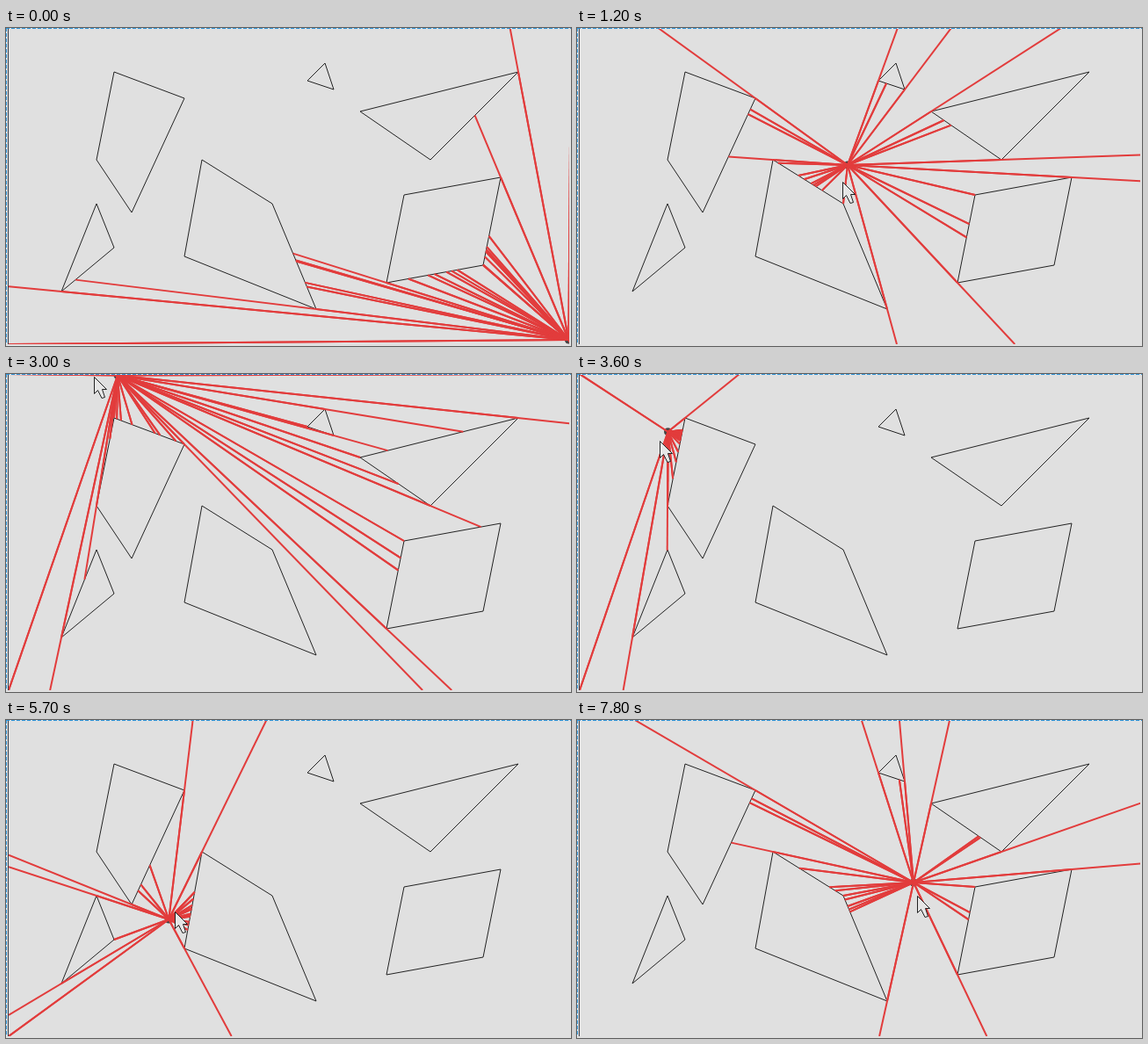
An HTML page with a canvas that plays this animation: 643 by 362 pixels, repeating every 8 s.

```html
<!DOCTYPE html>
<html lang="en">
<head>
<meta charset="utf-8">
<title>Sight rays</title>
<style>
html, body { margin: 0; width: 100%; height: 100%; overflow: hidden; background: #e0e0e0; }
canvas { display: block; }
</style>
</head>
<body>
<canvas id="stage" width="643" height="362"></canvas>
<script>
const ctx = document.getElementById('stage').getContext('2d');
const LOOP = 8000, STEP = 300;

const border = [[3, 0], [643, 0], [643, 360], [3, 360]];
const shapes = [
  [[103, 150], [123, 50], [203, 80], [143, 210]],
  [[103, 200], [123, 250], [63, 300]],
  [[203, 260], [223, 150], [303, 200], [353, 320]],
  [[343, 60], [363, 40], [373, 70]],
  [[453, 190], [563, 170], [543, 270], [433, 290]],
  [[403, 95], [583, 50], [483, 150]]
];
const arrow = [[0, 0], [0, 19], [4, 15], [8.5, 24], [12, 23], [9, 14], [14, 14]];

const all = [border, ...shapes];
const points = all.flat();
const segments = all.flatMap(p => p.map((a, i) => [a, p[(i + 1) % p.length]]));

// step, eye x, eye y, cursor offset x, cursor offset y
const keys = [
  [0, 640.3, 355, 20, 20],
  [4, 308, 156, -6, 19],
  [10, 127, 1.5, -27, 1.5],
  [14, 80, 130, 8, 19],
  [15, 99, 173, 8, 18],
  [17, 132, 214, 12, 10],
  [19, 185.3, 227, 6.5, -9],
  [21, 185, 193, 10, -3],
  [23, 299, 93, 17, 9],
  [26, 383, 185, 4, 15]
];

function pose(step) {
  const i = Math.max(1, keys.findIndex(k => k[0] >= step));
  const a = keys[i - 1], b = keys[i];
  const f = (step - a[0]) / (b[0] - a[0]);
  return a.map((v, j) => v + (b[j] - v) * f).slice(1);
}

function castRay(x, y, angle) {
  const dx = Math.cos(angle), dy = Math.sin(angle);
  let best = Infinity;
  for (const [a, b] of segments) {
    const sx = b[0] - a[0], sy = b[1] - a[1];
    const px = a[0] - x, py = a[1] - y;
    const det = dx * sy - dy * sx;
    const t = (px * sy - py * sx) / det;
    const u = (px * dy - py * dx) / det;
    if (t > 0 && u >= 0 && u <= 1 && t < best) best = t;
  }
  return best < Infinity ? [x + dx * best, y + dy * best] : [x, y];
}

function trace(pts) {
  ctx.beginPath();
  pts.forEach(p => ctx.lineTo(p[0], p[1]));
  ctx.closePath();
}

function drawFrame() {
  ctx.fillStyle = '#e0e0e0';
  ctx.fillRect(0, 0, 643, 362);

  // dashed selection edge
  ctx.fillStyle = '#cfe4f2';
  ctx.fillRect(0, 0, 643, 1);
  ctx.fillRect(0, 0, 1, 360);
  ctx.fillStyle = '#2f93d6';
  for (let i = 0; i < 643; i += 6) {
    ctx.fillRect(i, 0, 4, 1);
    if (i < 360) ctx.fillRect(0, i, 1, 4);
  }
  ctx.fillStyle = '#3a3f4a';
  ctx.fillRect(2, 1, 1, 359);
}

function draw(step) {
  const [x, y, ox, oy] = pose(step);
  drawFrame();

  ctx.save();
  ctx.beginPath();
  ctx.rect(3, 1, 638, 359);
  ctx.clip();

  ctx.strokeStyle = '#222';
  ctx.lineWidth = 1;
  for (const s of shapes) {
    trace(s);
    ctx.stroke();
  }

  ctx.fillStyle = '#444';
  ctx.beginPath();
  ctx.arc(x, y, 4.5, 0, 7);
  ctx.fill();

  // two rays per corner, one just to each side of it
  ctx.strokeStyle = '#e23c3c';
  ctx.lineWidth = 2;
  for (const p of points) {
    const angle = Math.atan2(p[1] - y, p[0] - x);
    for (const d of [-1e-5, 1e-5]) {
      ctx.beginPath();
      ctx.moveTo(x, y);
      ctx.lineTo(...castRay(x, y, angle + d));
      ctx.stroke();
    }
  }

  if (step > 0) {
    ctx.translate(Math.round(x + ox) + 0.5, Math.round(y + oy) + 0.5);
    trace(arrow);
    ctx.fillStyle = '#e6e6e6';
    ctx.fill();
    ctx.strokeStyle = '#222';
    ctx.lineWidth = 1;
    ctx.stroke();
  }
  ctx.restore();
}

function tick() {
  draw(Math.floor(performance.now() % LOOP / STEP));
  requestAnimationFrame(tick);
}
tick();
</script>
</body>
</html>
```
